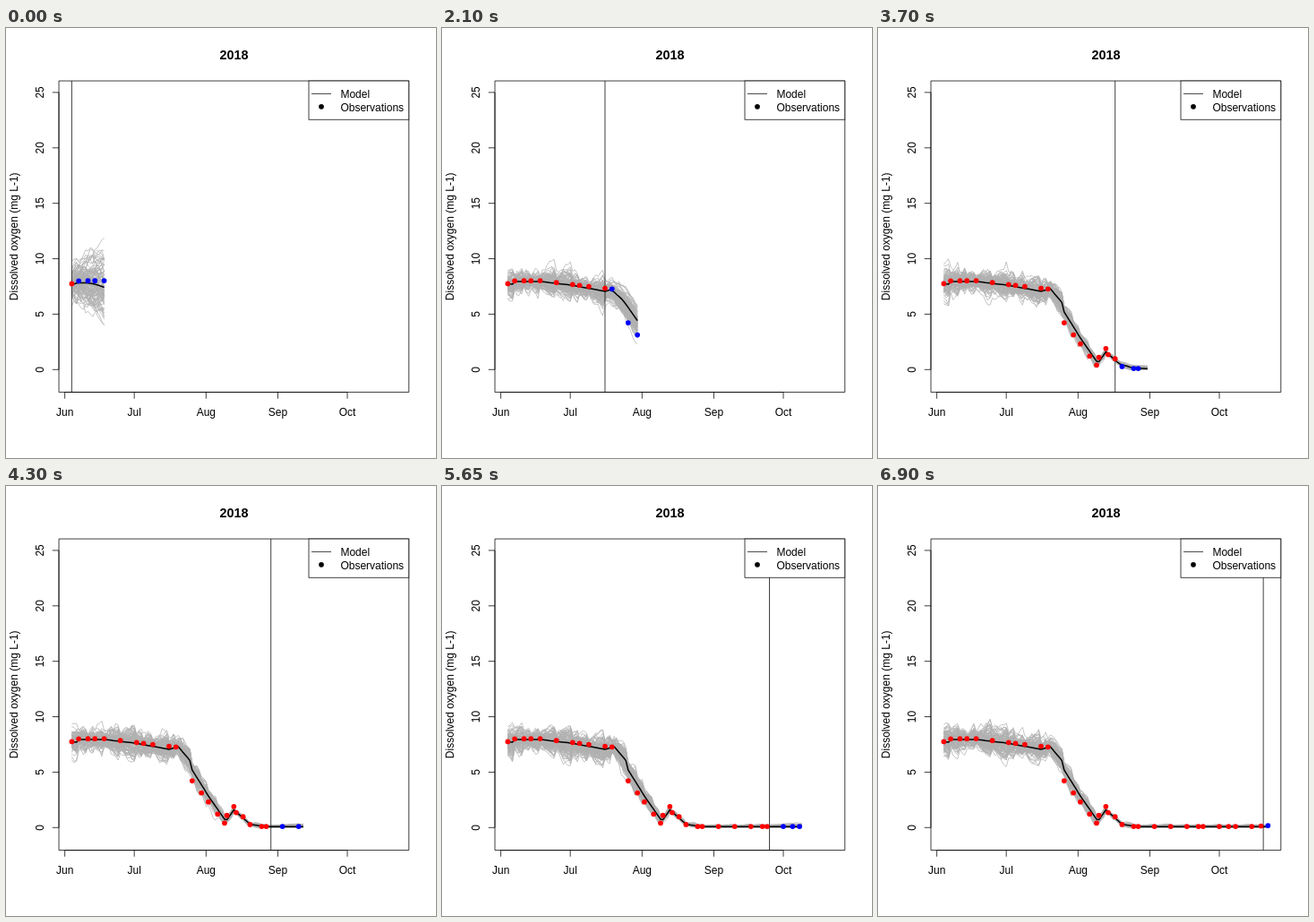
An HTML page for the animation above (6950 ms loop, 480 by 480 pixels).

```html
<!DOCTYPE html>
<html lang="en">
<head>
<meta charset="utf-8">
<title>Dissolved oxygen forecast</title>
<style>
  html, body { margin: 0; width: 100%; height: 100%; overflow: hidden; background: #fff; }
  svg { display: block; width: 100vw; height: 100vh; }
  text { font: 12px "Liberation Sans", Arial, sans-serif; }
  .title { font-size: 14.4px; font-weight: bold; }
  .mid { text-anchor: middle; }
  .thin { fill: none; stroke: #000; stroke-width: 0.75; }
  .ensemble { fill: none; stroke: #b0b0b0; stroke-width: 0.75; stroke-linejoin: round; }
  .mean { fill: none; stroke: #000; stroke-width: 1.5; stroke-linejoin: round; }
</style>
</head>
<body>
<svg id="chart" viewBox="0 0 480 480"></svg>
<script>
const STEP = 50, STEPS = 139, FIRST_DAY = 3, LAST_DAY = 143, HORIZON = 14, MEMBERS = 100;
const LEFT = 59.04, RIGHT = 449.76, TOP = 59.04, BOTTOM = 406.56, DOT = 2.85;
const px = day => 65.65 + day * 2.585;
const py = value => 381.31 - value * 12.376;

// Key points of both curves: [days since 1 June, mg/L]
const observedCurve = [
  [3, 7.75], [6, 8], [17, 8.02], [38, 7.5], [48, 7.27], [55, 4.22], [69, 0.4],
  [70, 1.1], [73, 1.9], [74, 1.35], [77, 0.98], [80, 0.27], [85, 0.1], [136, 0.1], [143, 0.18]
];
const modelCurve = [
  [3, 7.73], [5, 7.7], [6, 7.95], [17, 7.95], [31, 7.6], [45, 7.05], [49, 7.3],
  [54, 6.05], [55, 5.2], [62, 2.85], [69, 0.75], [70, 0.7], [73, 1.6], [80, 0.3], [87, 0.08]
];
const forecastBias = [[3, -0.5], [38, -0.1], [45, 0.5], [77, 0]];

// Samples are taken every Monday, bar one, and on some extra days.
const sampleDays = new Set([6, 13, 34, 48, 55, 62, 69, 70, 74, 77, 85, 113, 126, 140]);
for (let day = FIRST_DAY; day <= LAST_DAY; day += 7) sampleDays.add(day);
sampleDays.delete(52);

function interpolate(knots, x) {
  const i = knots.findIndex(([kx]) => kx >= x);
  if (i < 0) return knots[knots.length - 1][1];
  if (i === 0) return knots[0][1];
  const [x0, y0] = knots[i - 1], [x1, y1] = knots[i];
  return y0 + (y1 - y0) * (x - x0) / (x1 - x0);
}

function randomSource(seed) {
  let s = seed * 7919 + 17;
  return () => {
    s = s + 0x6D2B79F5 | 0;
    let t = Math.imul(s ^ s >>> 15, 1 | s);
    t ^= t + Math.imul(t ^ t >>> 7, 61 | t);
    return ((t ^ t >>> 14) >>> 0) / 4294967296;
  };
}

const gaussian = random =>
  Math.sqrt(-2 * Math.log(1 - random())) * Math.cos(2 * Math.PI * random());

// Forecast means lack the jumps that samples cause, so they are smoothed.
function meanAt(day, today) {
  const lead = day - today;
  if (lead <= 0) return interpolate(modelCurve, day);
  const reach = Math.min(5, lead);
  let sum = 0;
  for (let k = -reach; k <= reach; k++) sum += interpolate(modelCurve, day + k);
  return sum / (2 * reach + 1) + interpolate(forecastBias, today) * (lead / HORIZON) ** 2;
}

// Daily random step: fades as oxygen runs out, larger for early forecasts
function noiseAt(day, today) {
  const base = 0.03 + 0.2 / (1 + Math.exp((day - 66) / 5));
  return day > today ? base * (0.75 + Math.exp(-today / 12)) : base;
}

const toPath = (days, values) =>
  "M" + days.map((day, i) => px(day).toFixed(1) + " " + py(values[i]).toFixed(1)).join("L");

function ensemblePath(days, means, today) {
  const random = randomSource(today);
  const noise = days.map(day => noiseAt(day, today));
  let path = "";
  for (let m = 0; m < MEMBERS; m++) {
    let offset = 0.58 * gaussian(random);
    path += toPath(days, days.map((day, i) => {
      if (i) offset += noise[i] * gaussian(random);
      if (i && day <= today && sampleDays.has(day)) offset *= 0.55;
      return Math.max(0.03, means[i] + offset);
    }));
  }
  return path;
}

const svg = document.getElementById("chart");
function add(tag, attributes, text) {
  const node = document.createElementNS("http://www.w3.org/2000/svg", tag);
  for (const name in attributes) node.setAttribute(name, attributes[name]);
  if (text) node.textContent = text;
  return svg.appendChild(node);
}
const thin = d => add("path", { class: "thin", d });
const upright = (x, y, text) =>
  add("text", { class: "mid", transform: `translate(${x} ${y}) rotate(-90)` }, text);

const ensemble = add("path", { class: "ensemble" });
const meanLine = add("path", { class: "mean" });
const todayLine = thin("");
const dots = [...sampleDays].map(day => ({
  day,
  node: add("circle", { cx: px(day), cy: py(interpolate(observedCurve, day)), r: DOT })
}));

thin(`M${LEFT} ${TOP}H${RIGHT}V${BOTTOM}H${LEFT}Z`);
thin(`M${px(0)} ${BOTTOM}H${px(122)}`);
thin(`M${LEFT} ${py(0)}V${py(25)}`);
[["Jun", 0], ["Jul", 30], ["Aug", 61], ["Sep", 92], ["Oct", 122]].forEach(([month, day]) => {
  thin(`M${px(day)} ${BOTTOM}v7.2`);
  add("text", { class: "mid", x: px(day), y: 432.5 }, month);
});
for (let value = 0; value <= 25; value += 5) {
  thin(`M${LEFT} ${py(value)}h-7.2`);
  upright(41.8, py(value), String(value));
}
upright(13, 232.8, "Dissolved oxygen (mg L-1)");
add("text", { class: "mid title", x: 254.4, y: 35 }, "2018");

add("rect", { class: "thin", style: "fill:#fff", x: 338, y: TOP, width: RIGHT - 338, height: 43.2 });
thin("M341 73.4H363");
add("circle", { cx: 352, cy: 87.8, r: DOT });
add("text", { x: 373.4, y: 78 }, "Model");
add("text", { x: 373.4, y: 93 }, "Observations");

function draw(step) {
  const today = FIRST_DAY + step;
  const end = Math.min(LAST_DAY, today + HORIZON);
  const days = Array.from({ length: end - FIRST_DAY + 1 }, (_, i) => FIRST_DAY + i);
  const means = days.map(day => meanAt(day, today));
  ensemble.setAttribute("d", ensemblePath(days, means, today));
  meanLine.setAttribute("d", toPath(days, means));
  todayLine.setAttribute("d", `M${px(today)} ${TOP}V${BOTTOM}`);
  for (const { day, node } of dots) {
    node.setAttribute("fill", day <= today ? "#f00" : "#00f");
    node.setAttribute("visibility", day <= end ? "visible" : "hidden");
  }
}

let shown = -1;
function tick() {
  const step = Math.floor(performance.now() / STEP) % STEPS;
  if (step !== shown) draw(shown = step);
  requestAnimationFrame(tick);
}
tick();
</script>
</body>
</html>
```
